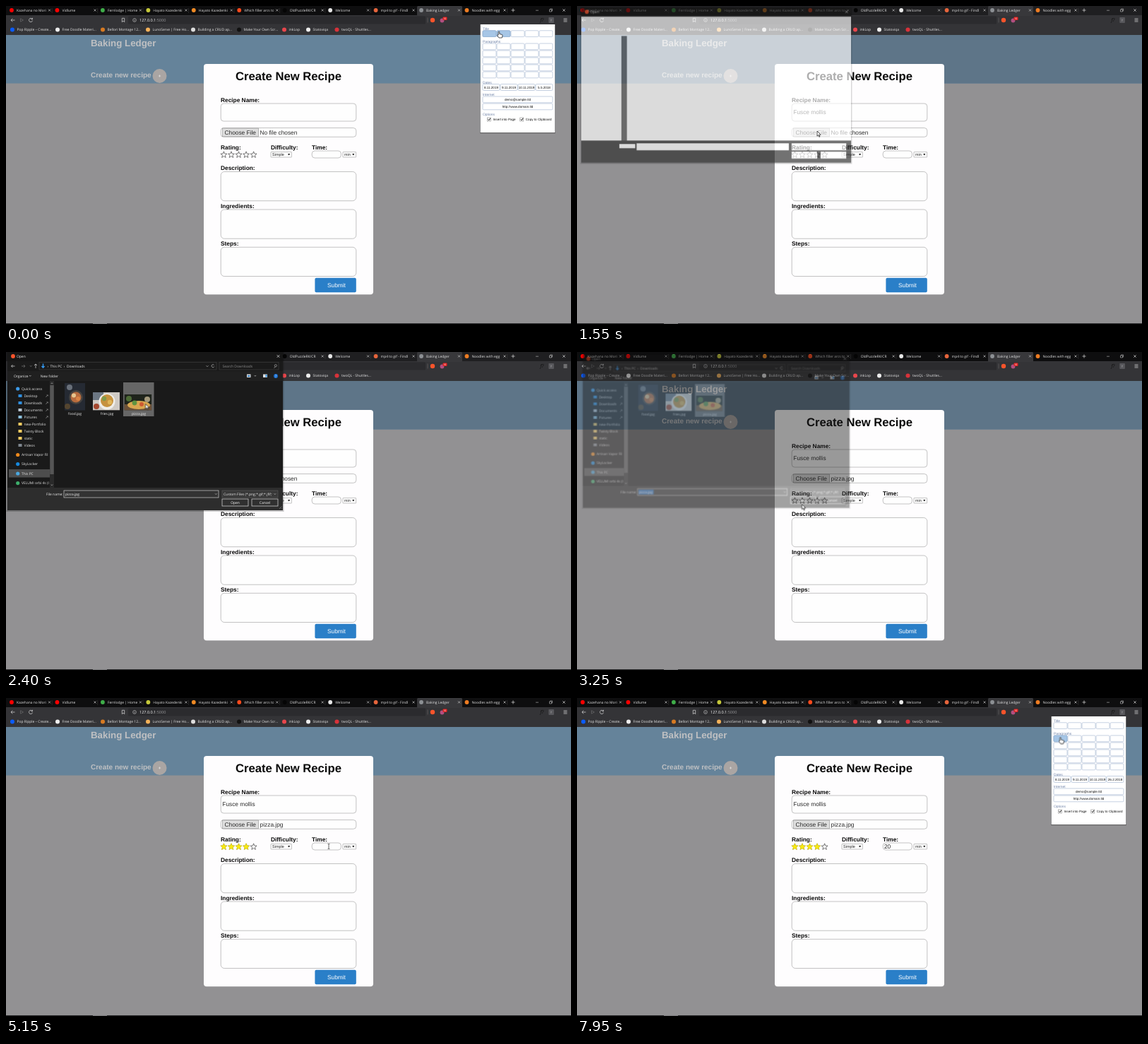
Write an HTML page that moves like this. It is 800 px wide and 450 px high and loops after 8 s.

```html
<!DOCTYPE html>
<html lang="en">
<head>
<meta charset="utf-8">
<title>Recipe form</title>
<style>
html, body { margin: 0; width: 100%; height: 100%; overflow: hidden; background: #929193; }
svg#stage { display: block; width: 800px; height: 450px; }
text { font-family: "Liberation Sans", Arial, sans-serif; text-rendering: geometricPrecision; white-space: pre; }
.ui text { font-family: "Open Sans", "Noto Sans", sans-serif; font-size: 4.95px; }
.bold { font-weight: 700; }
.field { fill: #fefefe; stroke: #9a9a9a; stroke-width: .6; }
.cell { fill: #fff; stroke: #9fb3cf; stroke-width: .6; }
.line { fill: none; stroke-width: .7; }
#cursor { animation: move 8s ease-in-out infinite; }
#dialog { transform-origin: 197px 112px; animation: dialog 8s linear infinite; }
@keyframes move {
  0%, 4.5% { transform: translate(698px, 36px); }
  16.5%, 22.5% { transform: translate(340px, 177px); }
  28%, 30.5% { transform: translate(197.5px, 73.5px); }
  37%, 43% { transform: translate(318.5px, 215.5px); }
  47.5%, 52.5% { transform: translate(339px, 211px); }
  57.5%, 76.5% { transform: translate(457px, 210px); }
  79%, 80.5% { transform: translate(430px, 256px); }
  84.4% { transform: translate(718px, 39.5px); }
  87% { transform: translate(768px, 21px); }
  90.6% { transform: translate(770px, 20px); }
  97%, 100% { transform: translate(684.5px, 55.5px); }
}
@keyframes dialog {
  0%, 18% { opacity: 0; transform: scale(.94); }
  19.4% { opacity: .68; transform: scale(.98); }
  21%, 39% { opacity: 1; transform: none; }
  40.6% { opacity: .45; transform: scale(.968); }
  42.2%, 100% { opacity: 0; transform: scale(.94); }
}
</style>
</head>
<body>
<svg id="stage" viewBox="0 0 800 450"></svg>
<script>
const LOOP = 8000;
const rect = (x, y, w, h, fill, attr = '') =>
  `<rect x="${x}" y="${y}" width="${w}" height="${h}" fill="${fill}" ${attr}/>`;
const dot = (x, y, r, fill, attr = '') => `<circle cx="${x}" cy="${y}" r="${r}" fill="${fill}" ${attr}/>`;
const text = (x, y, str, fill = '#000', attr = '') => `<text x="${x}" y="${y}" fill="${fill}" ${attr}>${str}</text>`;
const line = (d, stroke, attr = '') => `<path class="line" d="${d}" stroke="${stroke}" ${attr}/>`;
const box = (cls, x, y, w, h, r) => `<rect class="${cls}" x="${x}" y="${y}" width="${w}" height="${h}" rx="${r}"/>`;
const clip = (x, y, w, str, fill) => `<svg x="${x}" y="${y - 7}" width="${w}" height="10">${text(0, 7, str, fill)}</svg>`;
const cross = (x, y, r, color) => line(`M${x - r} ${y - r}l${2 * r} ${2 * r}m0 ${-2 * r}l${-2 * r} ${2 * r}`, color);
const range = n => [...Array(n).keys()];
// Visible only in the given spans of ms: "from to from to"
const during = (spans, body) => `<g data-on="${spans}">${body}</g>`;

function browser() {
  const tabs = [
    ['Kazehana no Mori no', '#f00'], ['Vidlume', '#f00'], ['Fernlodge | Home', '#3fae49'],
    ['Hayato Kazedenki', '#c5c83a'], ['Hayato Kazedenki', '#f08a24'], ['Which filler arcs to', '#ff4a1c'],
    ['OldPuzzleRK/CR', '#050505'], ['Welcome', '#e8e8e8'], ['mp4 to gif - Findl', '#e6653c'],
    ['Baking Ledger', '#8c9094'], ['Noodles with egg', '#ee7c22']];
  const marks = [
    [9, 'Pop Ripple – Create...', '#0b5cff'], [73, 'Free Doodle Materi...', '#eee'],
    [137, 'Bellori Montage 12...', '#d77a22'], [201, 'LunoServe | Free Ho...', '#f3b15a'],
    [265, 'Building a CRUD ap...', '#ddd'], [330, 'Make Your Own Scr...', '#111'],
    [394, 'inkLop', '#e8464c'], [428, 'Statoviqa', '#eee'], [468.5, 'twoQL - Shuttles...', '#d8323a']];
  const strip = tabs.map(([name, color], i) => {
    const x = 8 + i * 64.45;
    return dot(x, 6, 2.9, color) + clip(x + 7, 8, 42, name, '#e2e2e2') + cross(x + 53.5, 6, 1.5, '#ccc')
      + (i < 8 || i > 9 ? line(`M${x + 57.2} 3v7`, '#444', 'opacity=".7"') : '');
  }).join('');
  const bookmarks = marks.map(([x, name, color]) =>
    dot(x, 33.5, 3, color) + text(x + 6.6, 35.3, name, '#e6e6e6')).join('');
  return `<g class="ui">${rect(0, 0, 800, 14, '#0e0e0f')}
    ${during('1450 3200', rect(0, 0, 800, 14, '#1f1f21'))}
    ${rect(0, 13, 800, 28, '#343437')}${rect(582, 0, 64, 14, '#38383b', 'rx="1.5"')}
    ${strip}${line('M715.5 6h5m-2.5-2.5v5', '#ddd')}
    ${line('M750 6.2h4M769.5 5h3v3h-3zM770.6 5v-1h3v3h-1', '#ddd', 'style="stroke-width:.5"')}${cross(790, 6, 1.7, '#ddd')}
    ${rect(173, 14.5, 421, 11, '#2b2b2e', 'rx="1.5"')}
    ${line('M12.5 20h-5.5m2.3-2.3l-2.3 2.3 2.3 2.3M37 18.2a2.6 2.6 0 1 0 .6 2.4M37.5 16.8v2h-2', '#ddd')}
    ${line('M20.5 17.8l4 2.2-4 2.2z', '#6a6a6c')}
    ${line('M164.3 17.3h3.4v5.4l-1.7-1.5-1.7 1.5z', '#ddd')}
    ${dot(182, 20, 2.4, 'none', 'stroke="#ccc" stroke-width=".6"')}${line('M182 19.7v1.7m0-2.8v.4', '#ccc')}
    ${text(189, 22, '127.0.0.1<tspan fill="#9a9a9c">:5000</tspan>', '#fff', 'style="font-size:5.5px"')}
    ${line('M597 16.5v7', '#666')}${dot(604, 20, 3.2, '#fb542b')}${dot(617.5, 20.5, 2.9, '#b24f80')}
    ${rect(618.5, 15.5, 6, 4.6, '#e02020', 'rx="1"')}${text(619.2, 19, '10', '#fff', 'style="font-size:3.5px"')}
    ${text(756.5, 22, 'f?', '#0c0c0c', 'font-style="italic" style="font-size:6.5px"')}
    ${rect(768.3, 16, 7.6, 8, '#57575b', 'rx=".8"')}${text(770.5, 22, 'Y', '#aaa')}
    ${line('M789.5 18h5m-5 2h5m-5 2h5', '#ddd')}${bookmarks}</g>`;
}

function page() {
  return rect(0, 41, 800, 409, '#929193') + rect(0, 41, 800, 68.5, '#65839a')
    + during('1450 3350', rect(0, 41, 800, 68.5, '#5e7588'))
    + text(120, 57, 'Baking Ledger', '#bfc0c2', 'class="bold" font-size="13.3"')
    + text(120, 101, 'Create new recipe', '#bfc0c2', 'class="bold" font-size="10"')
    + dot(217.5, 99, 10, '#aaa5a3') + line('M215.9 99h3.2m-1.6-1.6v3.2', '#e4e4e4')
    + rect(0, 449, 800, 1, '#1e1e20') + rect(123, 449, 20, 1, '#77777a');
}

function star(i, style) {
  const x = 308.4 + i * 10.55;
  const pts = range(10).map(k => {
    const r = k % 2 ? 2 : 4.7, a = (k / 5 - .5) * Math.PI;
    return `${(x + r * Math.cos(a)).toFixed(2)},${(210.6 + r * Math.sin(a)).toFixed(2)}`;
  });
  return `<polygon points="${pts.join(' ')}" ${style}/>`;
}

function form() {
  const labels = [[304, 136, 'Recipe Name:'], [304, 202.5, 'Rating:'], [375, 202.5, 'Difficulty:'],
    [433, 202.5, 'Time:'], [304, 232, 'Description:'], [304, 285.5, 'Ingredients:'], [304, 338.7, 'Steps:']];
  const select = (x, w, str) => box('field', x, 206.6, w, 7.4, .4) + text(x + 2, 212.2, str, '#222', 'font-size="5.5"')
    + `<path d="M${x + w - 5.3} 209h3l-1.5 2.6z" fill="#111"/>`;
  const caret = (x, y) => line(`M${x} ${y}v9`, '#222');
  const body = (x, y, str) => text(x, y, str, '#2b2b2b', 'font-size="8.33"');
  const lit = [3500, 3500, 3600, 3750];
  return rect(280, 82, 240, 326.3, '#fefdfe', 'rx="4"')
    + text(400, 105, 'Create New Recipe', '#0a0a0a', 'class="bold" font-size="16.65" text-anchor="middle"')
    + labels.map(([x, y, s]) => text(x, y, s, '#0a0a0a', 'class="bold" font-size="8.33"')).join('')
    + box('field', 304.2, 138, 191.6, 25, 4) + during('250 8000', body(306.3, 153, 'Fusce mollis'))
    + box('field', 304.2, 172.5, 191.6, 12.8, 4)
    + rect(306.5, 173, 51, 11.8, '#dedede', 'stroke="#8c8c8c" stroke-width=".6"')
    + body(309.5, 182, 'Choose File')
    + during('0 3080', body(359.6, 182, 'No file chosen')) + during('3080 8000', body(359.6, 182, 'pizza.jpg'))
    + range(5).map(i => star(i, 'fill="#fff" stroke="#222" stroke-width=".6"')).join('')
    + lit.map((ms, i) => during(`${ms} 8000`, star(i, 'fill="#f8ea10" stroke="#f3e000" stroke-width=".7"'))).join('')
    + select(375, 29.4, 'Simple') + select(477, 18.6, 'min')
    + box('field', 433.2, 205, 41.2, 10, 4)
    + during('4750 5150', caret(435.5, 205.5)) + during('5650 6100', caret(440.3, 205.5))
    + during('5600 8000', body(435, 213, '2')) + during('6100 8000', body(439.6, 213, '0'))
    + [234.5, 288, 341.3].map(y => box('field', 304.2, y, 191.6, 41.2, 5)).join('')
    + during('6450 6950', caret(308.8, 237.5))
    + rect(437.4, 384.8, 58.4, 20.5, '#2a7fc8', 'rx="2"') + text(455, 397.6, 'Submit', '#fff', 'font-size="8.33"');
}

function popup() {
  const label = (y, s) => text(675, y, s, '#6d80a6', 'font-size="4.9"');
  const note = (x, y, s, anchor = 'start') => text(x, y, s, '#111', `font-size="4.6" text-anchor="${anchor}"`);
  const cells = y => range(5).map(i => box('cell', 675 + i * 20, y, 19, 8.8, 1.5)).join('');
  const hot = (x, y) => rect(x, y, 19, 8.8, '#a6c6e6', 'rx="1.5" stroke="#7fa3cc" stroke-width=".6"');
  const check = (x, s) => rect(x, 158, 5, 5, '#fff', 'stroke="#777" stroke-width=".5"')
    + line(`M${x + 1} 160.4l1.3 1.4 2-3`, '#111', 'style="stroke-width:1"') + note(x + 8, 162.2, s);
  return during('0 450 7250 8000',
    rect(671, 26, 107, 154.2, '#000', 'opacity=".3"') + rect(671.7, 26, 105.6, 153, '#fff')
    + label(33.7, 'Title') + cells(34.8) + during('0 450', hot(675, 34.8) + hot(695, 34.8))
    + label(52, 'Paragraphs') + range(5).map(i => cells(53 + i * 10)).join('')
    + during('7700 8000', hot(675, 53))
    + label(109.5, 'Dates') + range(4).map(i => box('cell', 675 + i * 25, 110.5, 24, 9, 1.5)).join('')
    + ['8.11.2019', '9.11.2019', '10.11.2019'].map((s, i) => note(687 + i * 25, 116.7, s, 'middle')).join('')
    + during('0 450', note(762, 116.7, '5.5.2018', 'middle')) + during('7250 8000', note(762, 116.7, '26.2.2018', 'middle'))
    + label(127, 'Internet') + box('cell', 675, 128, 99, 8.8, 1.5) + box('cell', 675, 138, 99, 8.8, 1.5)
    + note(724.5, 134, 'demo@sample.tld', 'middle') + note(724.5, 144, 'http://www.domain.tld', 'middle')
    + label(155.3, 'Options') + check(681.5, 'Insert into Page') + check(727.8, 'Copy to Clipboard'));
}

function thumbs() {
  const food = rect(83, 44, 29, 38.5, '#252a33') + dot(99, 64, 10, '#45423f') + dot(99, 64, 7.5, '#b66b3e')
    + dot(96, 61.5, 3, '#e6c58f') + dot(102, 66, 3, '#d98345') + dot(90, 50, 4, '#69707a') + dot(87, 77, 4, '#54452f');
  const fries = rect(123, 57, 38, 25.3, '#cfcac4') + rect(123, 57, 15, 11, '#6c7783')
    + dot(143, 70, 11.5, '#f0eee9') + dot(143, 69, 9, '#c6923f') + dot(139, 66, 3.2, '#7f9a4a')
    + dot(147, 71, 3.2, '#e1b659') + dot(128, 77, 4, '#a5482f');
  const pizza = rect(167.7, 60, 38.4, 22.3, '#1f241c') + rect(167.7, 74, 38.4, 8.3, '#6b5138')
    + `<ellipse cx="188" cy="75" rx="16" ry="6" fill="#d9a750"/>` + dot(182, 72, 3.4, '#5f9440')
    + dot(192, 74, 3, '#ce5a32') + dot(174, 66, 4, '#4d6b36') + dot(200, 67, 4, '#a49a7c');
  const name = (x, s) => text(x, 88.6, s, '#eee', 'text-anchor="middle"');
  return during('2200 3500', rect(166, 43, 43.5, 48, '#666')) + food + fries + pizza
    + name(97.5, 'food.jpg') + name(143, 'fries.jpg') + name(188, 'pizza.jpg');
}

function dialog() {
  const side = [
    [52, 'Quick access', '#3d9be9'], [62, 'Desktop', '#2f8fe0'], [72, 'Downloads', '#2f8fe0'],
    [82, 'Documents', '#b9c6d2'], [92, 'Pictures', '#8cc0dd'], [102, 'new-Portfolio', '#f5cd62'],
    [112, 'Twisty Block', '#f5cd62'], [122, 'static', '#f5cd62'], [132, 'Videos', '#7f8790'],
    [145.5, 'Artisan Vapor Fil', '#f28a1c'], [158.6, 'SkyLocker', '#1688dc'],
    [172, 'This PC', '#4aa8e0'], [185.6, 'VELUMI orbi 4s (I', '#3dae6b']];
  const list = side.map(([y, s, color], i) => {
    const x = i > 0 && i < 9 ? 25.5 : 22;
    return (x === 22 ? dot(x - 5.3, y, 2.6, color) : rect(x - 8, y - 2, 5, 4, color))
      + clip(x, y + 1.8, 61 - x, s, '#e6e6e6')
      + (i > 0 && i < 5 ? line(`M56.5 ${y + 1.7}l3-3m-1.6-.4l2 2`, '#aaa') : '');
  }).join('');
  const button = (x, s) => rect(x, 208, 37, 10, '#303030', 'stroke="#ddd" stroke-width=".7"')
    + text(x + 18.5, 214.9, s, '#fff', 'text-anchor="middle"');
  const head = rect(2, 0, 390, 224, '#2d2d2d') + rect(2, 0, 390, 13, '#161616') + dot(10, 6, 2.9, '#fb542b')
    + text(15, 8, 'Open', '#eee') + cross(385.5, 6, 1.8, '#eee');
  const blank = rect(2, 13, 390, 179, '#fff') + rect(60, 41, 8, 151, '#555')
    + rect(57, 197, 23, 6, '#fff') + rect(82, 196, 220, 10, '#fff') + rect(306, 196, 79, 10, '#fff')
    + rect(306, 208, 37, 10, '#fff') + rect(348, 208, 37, 10, '#fff');
  const ready = rect(2, 13, 390, 14, '#1a1a1a') + rect(2, 27, 390, 14, '#202020') + rect(2, 41, 390, 151, '#1a1a1a')
    + line('M12.5 20h-5m2-2l-2 2 2 2M42 23v-6m-2 2l2-2 2 2', '#ddd') + line('M22 20h5m-2-2l2 2-2 2', '#777')
    + line('M34 19.3l1.2 1.2 1.2-1.2', '#999')
    + rect(47, 14.5, 251, 10.5, 'none', 'stroke="#444" stroke-width=".6"')
    + rect(302, 14.5, 84, 10.5, 'none', 'stroke="#444" stroke-width=".6"')
    + line('M52.5 16.5v5.5m-2-2l2 2.2 2-2.2', '#3599f0', 'style="stroke-width:1.4"')
    + text(58.5, 21.8, '›  This PC  ›  Downloads', '#eee') + text(306.5, 21.8, 'Search Downloads', '#8d8d8d')
    + line('M283.5 19.3l1.5 1.5 1.5-1.5M294.6 18.5a2 2 0 1 0 .3 2M381.5 20.8l-2 2', '#bbb')
    + dot(381.8, 19.3, 1.6, 'none', 'stroke="#bbb" stroke-width=".6"')
    + text(11, 35.7, 'Organize', '#eee') + line('M33 33l1.3 1.3 1.3-1.3', '#ccc') + text(48.7, 35.7, 'New folder', '#eee')
    + rect(341, 31.5, 5.5, 4.5, '#ddd') + rect(342, 33, 3.5, 2, '#357ec0') + line('M351.5 33l1.3 1.3 1.3-1.3', '#ccc')
    + rect(364, 31.5, 6, 4.5, '#ddd') + rect(367.5, 32, 2, 3.5, '#2f8fe0')
    + dot(382, 34, 2.9, '#1d73d4') + text(380.9, 35.8, '?', '#fff')
    + rect(4, 166, 58, 11.5, '#4d4d4d') + list
    + rect(62, 41, 6, 151, '#2a2a2a') + rect(62.3, 47, 5.4, 126, '#565656')
    + line('M63.7 45l1.3-1.3 1.3 1.3M63.7 187.5l1.3 1.3 1.3-1.3', '#bbb')
    + thumbs() + text(57, 202.6, 'File name:', '#eee')
    + rect(82, 196, 219, 10, '#333', 'stroke="#ccc" stroke-width=".7"')
    + during('3050 3500', rect(83.5, 197.5, 22, 7, '#2873c4'))
    + during('2350 3500', text(84, 202.8, 'pizza.jpg', '#fff')) + line('M296 200.3l1.3 1.3 1.3-1.3', '#ccc')
    + rect(306, 196, 79, 10, '#383838', 'stroke="#666" stroke-width=".5"')
    + clip(308, 202.8, 69, 'Custom Files (*.png;*.gif;*.jfif;*.jpg', '#eee') + line('M379.5 200.3l1.3 1.3 1.3-1.3', '#ccc')
    + button(306, 'Open') + button(348, 'Cancel') + line('M387 222l3.5-3.5m-1 3.5l1-1', '#888');
  return `<g id="dialog" class="ui">${rect(.5, 0, 393, 226, '#000', 'opacity=".2"')}${head}
    ${during('0 1660', blank)}${during('1660 8000', ready)}</g>`;
}

function cursor() {
  const shape = d => `<path d="${d}" fill="#fff" stroke="#111" stroke-width=".7" stroke-linejoin="round"/>`;
  return `<g id="cursor">
    ${during('0 440 7640 8000', shape('M-.9 .6q.9-1.2 1.7 0v3l3.4.8q1 .3.8 1.5l-.7 3.1h-4.3l-2.6-3.6q.2-1.1 1.7-.2z'))}
    ${during('440 4560 6400 7640', shape('M0 0v7.2l1.7-1.6 1.2 2.7 1.1-.5-1.2-2.6h2.4z'))}
    ${during('4560 6400', line('M-1.4-3.6q1.4 0 1.4.7v5.8q0 .7 1.4.7M1.4-3.6q-1.4 0-1.4.7M0 2.9q0 .7-1.4.7', '#222'))}</g>`;
}

const stage = document.getElementById('stage');
stage.innerHTML = page() + browser() + form() + popup() + dialog() + cursor();

// Turn every list of spans into stepped keyframes
const rules = [...stage.querySelectorAll('[data-on]')].map((el, n) => {
  const marks = el.dataset.on.split(' ').map(Number);
  const steps = marks.map((ms, i) => ms < LOOP ? `${ms / LOOP * 100}%{opacity:${1 - i % 2}}` : '');
  if (marks[0] > 0) steps.unshift('0%{opacity:0}');
  el.style.animation = `span${n} ${LOOP}ms step-end infinite`;
  return `@keyframes span${n}{${steps.join('')}}`;
});
document.head.appendChild(document.createElement('style')).textContent = rules.join('\n');
</script>
</body>
</html>
```
